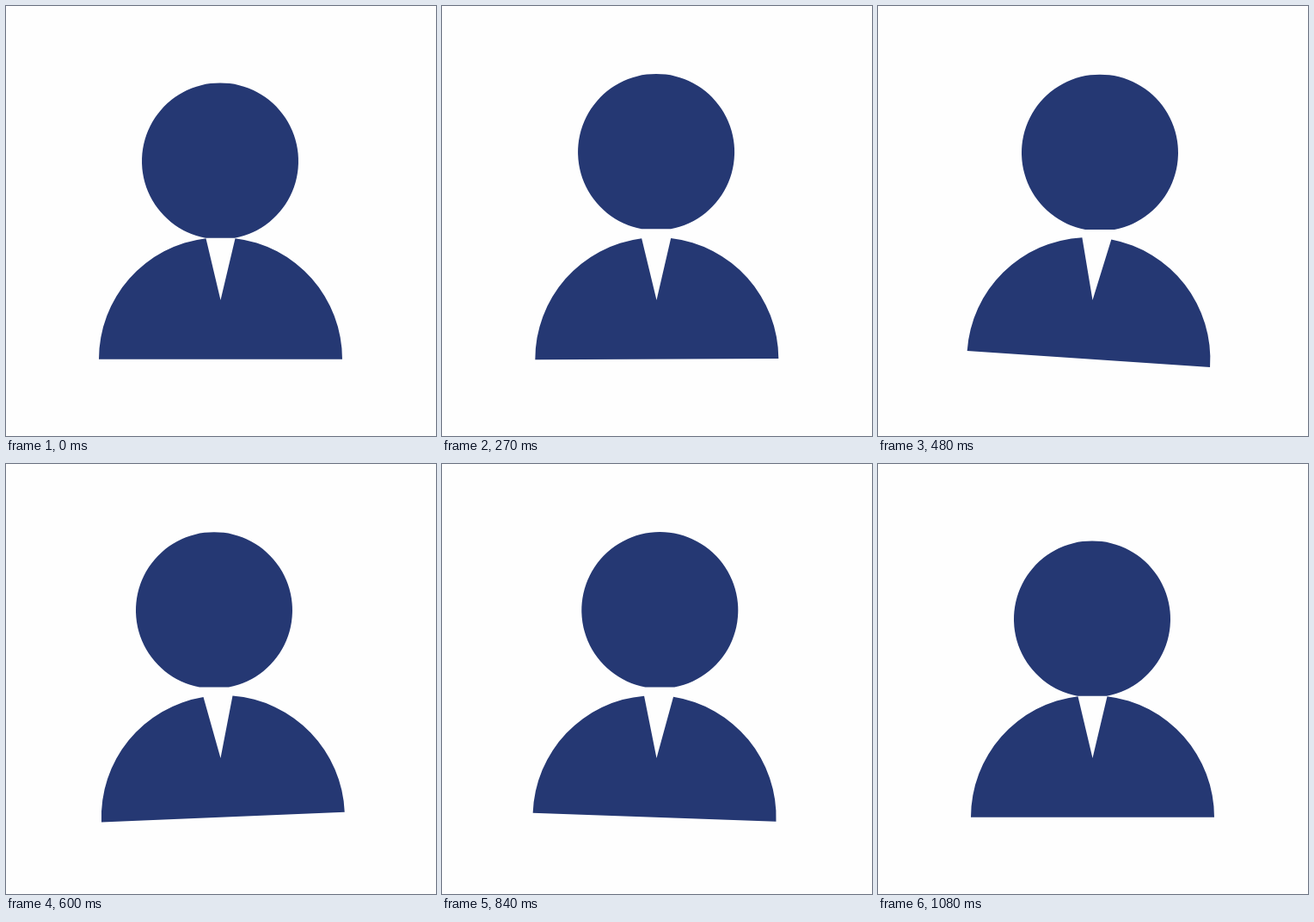
Recreate the animation shown at these times as an HTML page. Size 500 by 500 pixels, loop 1.86 s.

```html
<!DOCTYPE html>
<html lang="en">
<head>
<meta charset="utf-8">
<title>Person icon</title>
<style>
  html, body { margin: 0; width: 100%; height: 100%; overflow: hidden; background: #fefefe; }
  svg { display: block; width: 100%; height: 100%; fill: #253873; }
</style>
</head>
<body>
<svg viewBox="0 0 500 500">
  <path id="body" d="M108 410.7A141.5 141.5 0 0 1 232.5 270.2L249.5 342L266.5 270.2A141.5 141.5 0 0 1 391 410.7Z"/>
  <!-- circle with a flat chin, centred on the origin -->
  <path id="head" d="M-17 89.4A91 91 0 1 1 17 89.4Z"/>
</svg>
<script>
const LOOP = 1860, STEP = 30;
// Times below are in steps
const SWING_START = 11.5, SWING_END = 26.5, HALF_SWING = 5, RAMP = 3;
const body = document.getElementById('body');
const head = document.getElementById('head');

const clamp = (v, lo, hi) => Math.min(hi, Math.max(lo, v));

// Sine ease from 0 to 1 between two times
const ease = (t, from, to) => (1 - Math.cos(Math.PI * clamp((t - from) / (to - from), 0, 1))) / 2;

function draw() {
  const t = Math.floor(performance.now() % LOOP / STEP);
  const rise = ease(t, 0, 8), fall = ease(t, 29, 36);
  const rampIn = ease(t, SWING_START - RAMP, SWING_START);
  const rampOut = ease(t, SWING_END, SWING_END + RAMP);
  const phase = (clamp(t, SWING_START, SWING_END) - SWING_START) / HALF_SWING;
  const sway = -Math.cos(Math.PI * phase) * rampIn * (1 - rampOut);

  const drift = 0.9 * (rise - 2 * rampIn + fall);
  const x = 249 + drift + 10.4 * sway;
  const y = 180.4 - 10.5 * (rise - fall) + 0.8 * sway * sway;
  body.setAttribute('transform', `rotate(${4.07 * sway} 249.5 342)`);
  head.setAttribute('transform', `translate(${x} ${y})`);
  requestAnimationFrame(draw);
}
draw();
</script>
</body>
</html>
```
